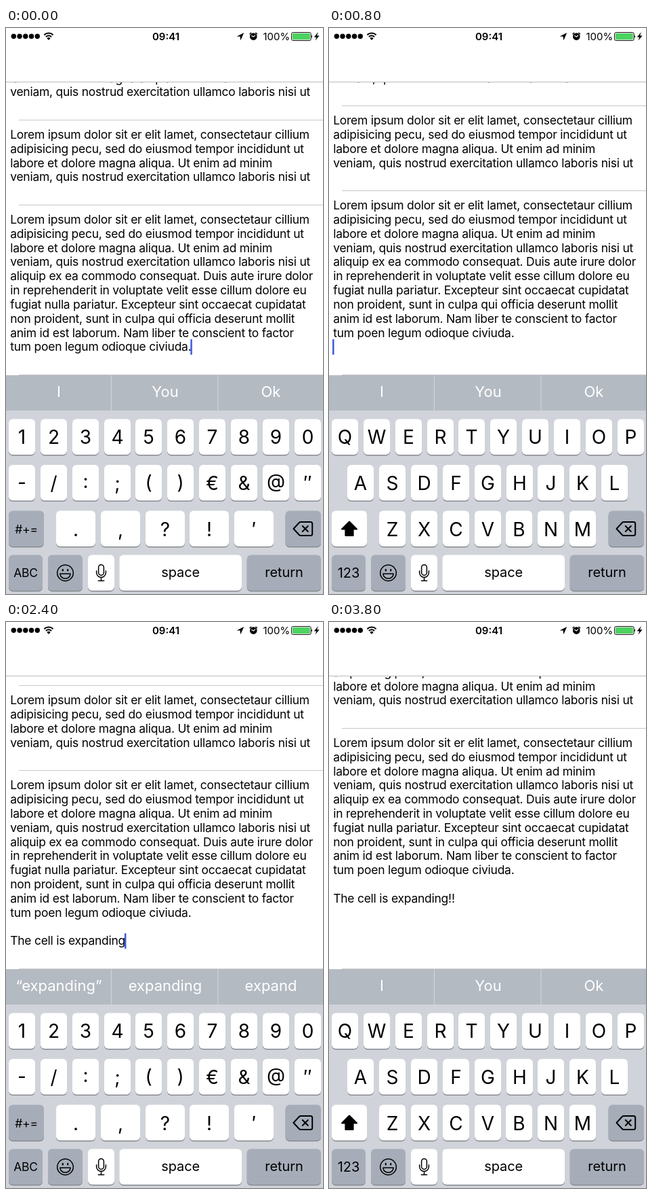
An HTML page that plays this animation: 468x833 px, repeating every 3.92 s.

```html
<!DOCTYPE html>
<html lang="en">
<head>
<meta charset="utf-8">
<title>Growing text cell</title>
<style>
  html, body { margin: 0; width: 100%; height: 100%; overflow: hidden; background: #fff; }
  svg { display: block; width: 468px; height: 833px; }
  text {
    font-family: Inter, Roboto, "Liberation Sans", sans-serif;
    font-optical-sizing: none;
    white-space: pre;
  }
  .body { font-size: 17.47px; letter-spacing: -.23px; }
  .time { font-size: 15px; font-weight: 600; text-anchor: middle; font-feature-settings: "case"; }
  .key { font-size: 28px; text-anchor: middle; font-feature-settings: "case"; }
  .low { font-size: 30px; text-anchor: middle; }
  .small { font-size: 17.5px; text-anchor: middle; letter-spacing: -.2px; }
  .word { font-size: 20px; text-anchor: middle; letter-spacing: -.1px; }
  .hint { font-size: 22px; fill: #fff; text-anchor: middle; }
  .h1 { font-size: 20px; fill-opacity: .75; }
  .h2 { font-size: 16px; fill-opacity: .5; }
  .h3 { fill-opacity: .5; }
  .line { fill: none; stroke: #000; stroke-width: 2; stroke-linejoin: round; stroke-linecap: round; }
  .thin { stroke-width: 1.5; }
  .balloon { fill: #fff; filter: drop-shadow(0 1px 3px rgba(0, 0, 0, .4)); }
</style>
</head>
<body>
<svg viewBox="0 0 468 833">
  <defs><clipPath id="view"><rect y="80" width="468" height="431"/></clipPath></defs>
  <rect width="468" height="833" fill="#fff"/>
  <g clip-path="url(#view)"><g id="list"></g></g>
  <rect y="79" width="468" height="1" fill="#bcbcbe"/>
  <g id="status"></g>
  <rect y="511" width="468" height="322" fill="#d0d3d9"/>
  <rect y="511" width="468" height="52" fill="#b4bac2"/>
  <path d="M155.5 511v52M313 511v52" stroke="#cfd3d8" stroke-width="1.2"/>
  <g id="hints"></g>
  <g id="keys"></g>
</svg>
<script>
const LOOP = 3920, STEP = 200, LINE = 20.83, LEFT = 6.2;
const DARK = '#a6adb9', WHITE = '#fff';

const LOREM = [
  'Lorem ipsum dolor sit er elit lamet, consectetaur cillium',
  'adipisicing pecu, sed do eiusmod tempor incididunt ut',
  'labore et dolore magna aliqua. Ut enim ad minim',
  'veniam, quis nostrud exercitation ullamco laboris nisi ut',
  'aliquip ex ea commodo consequat. Duis aute irure dolor',
  'in reprehenderit in voluptate velit esse cillum dolore eu',
  'fugiat nulla pariatur. Excepteur sint occaecat cupidatat',
  'non proident, sunt in culpa qui officia deserunt mollit',
  'anim id est laborum. Nam liber te conscient to factor',
  'tum poen legum odioque civiuda.'
];

// Hints: parts split by "|", each led by its style digit.
const BASIC = ['0I', '0You', '0Ok'];
const DONE = '\n\nThe cell is expanding!!';
const END = DONE + '\n\n\n';

const step = (typed, board, caret = 1, more = {}) => ({ typed, board, caret, hints: BASIC, ...more });
const STEPS = [
  step('', 'sym'),
  step('', 'sym', 0),
  step('', 'sym', 0, { shift: 5, bar: 1 }),
  step('\n', 'sym', 0),
  step('\n', 'upper'),
  step('\n\n', 'upper'),
  step('\n\nThe', 'lower', 1, { press: 'space', hints: ['0“T|2”', '0Th|1e', '0Tha|1t|2\'s'] }),
  step('\n\nThe ce', 'lower', 1, { hints: ['0“ce”', '0cell', '0certain'] }),
  step('\n\nThe cell is', 'lower', 1, { press: 'space', hints: ['0“is”', '0isn\'t', '0issue'] }),
  step('\n\nThe cell is e', 'lower', 1, { pop: 1, hints: ['3“|0e”', '0expec|1t|3e', '0everythin|1g'] }),
  step('\n\nThe cell is expa', 'lower', 1, { hints: ['0“expa”', '0expand', '0expanding'] }),
  step('\n\nThe cell is expandin', 'lower', 1, { hints: ['0“expandin”', '0expanding', '0expand'] }),
  step('\n\nThe cell is expanding', 'sym', 1, { hints: ['0“expanding”', '0expanding', '0expand'] }),
  step(DONE.slice(0, -1), 'sym'),
  step(DONE, 'sym'),
  step(DONE, 'sym', 1, { press: 'return' }),
  step(END, 'upper'),
  step(END, 'upper', 0),
  step(END, 'upper'),
  step(END, 'upper', 0)
];

const el = id => document.getElementById(id);
const esc = s => s.replace(/&/g, '&amp;');
const label = (cls, x, y, s) => `<text class="${cls}" x="${x}" y="${y}">${esc(s)}</text>`;
const rect = (x, y, w, h, fill, r = 0) =>
  `<rect x="${x}" y="${y}" width="${w}" height="${h}" rx="${r}" fill="${fill}"/>`;
const cap = (x, y, w, fill = WHITE) =>
  rect(x, y + 1.4, w, 52.6, '#888b90', 6) + rect(x, y, w, 52.6, fill, 6);

function drawStatus() {
  const dots = [0, 1, 2, 3, 4].map(i => `<circle cx="${11.3 + i * 8.75}" cy="12.3" r="3.7"/>`).join('');
  el('status').innerHTML = dots + `
    <path d="M56.4 10.2a9.4 9.4 0 0 1 13.2 0M58.9 13a5.9 5.9 0 0 1 8.2 0" fill="none" stroke="#000" stroke-width="2"/>
    <path d="M60.4 15.1a3.7 3.7 0 0 1 5.2 0L63 18z"/>
    ${label('time', 236, 17.6, '09:41')}
    <path d="M340.5 12.4L351.3 7l-5 11.2-.8-5.8z"/>
    <circle cx="365.3" cy="12.6" r="5.3"/>
    <path d="M359.6 9.2l2.6-2.4M371 9.2l-2.6-2.4" stroke="#000" stroke-width="1.3"/>
    <path d="M362.3 11.2l3 1.8 2.7-2.4" fill="none" stroke="#fff" stroke-width="1.2"/>
    <text x="379.5" y="17.7" font-size="15">100%</text>
    <rect x="421.6" y="6.6" width="28.6" height="11.8" rx="2" fill="none" stroke="#000"/>
    <rect x="423" y="8" width="25.8" height="9" rx="1" fill="#4cd35f"/>
    <path d="M451 10.5q2.2 2 0 4z"/>
    <path d="M460.8 6l-6 7.4h3.4l-1.6 5.2 6-7.4h-3.5z"/>`;
}

function drawList(s) {
  const lines = LOREM.slice();
  const [first, ...rest] = s.typed.split('\n');
  lines[9] += first;
  lines.push(...rest);
  const off = s.shift || rest.length * LINE;
  const row = (top, t, i) => label('body', LEFT, (top + 28 + i * LINE - off).toFixed(2), t);
  let out = '';
  for (const top of [10, 135]) {
    out += LOREM.slice(0, 4).map((t, i) => row(top, t, i)).join('');
    out += rect(19, Math.round(top - off), 449, 1, '#c8c7cc');
  }
  out += rect(19, Math.round(260 - off), 449, 1, '#c8c7cc');
  out += rect(19, s.shift ? 505 : 510, 449, 1, '#c8c7cc');
  out += lines.map((t, i) => row(260, t, i)).join('');
  if (s.bar) out += rect(462, 441, 3.2, 76, '#8c8c8c', 1.6);
  const list = el('list');
  list.innerHTML = out;
  if (s.caret) {
    const all = list.querySelectorAll('text');
    const x = LEFT - 1.2 + all[all.length - 1].getComputedTextLength();
    list.insertAdjacentHTML('beforeend', rect(x.toFixed(2), 458, 2.6, 23, '#3f60dd', 1));
  }
}

function drawHints(hints) {
  el('hints').innerHTML = hints.map((h, i) => {
    const parts = h.split('|').map(p => `<tspan class="h${p[0]}">${p.slice(1)}</tspan>`);
    return `<text class="hint" x="${[78, 235, 391][i]}" y="543">${parts.join('')}</text>`;
  }).join('');
}

function keyRow(chars, x, y, cls, pitch = 46.87, w = 39) {
  const base = y + (cls === 'low' ? 35 : 37);
  return [...chars].map((c, i) => {
    const left = Math.round(x + i * pitch);
    return cap(left, y, w) + label(cls, left + w / 2, base, c);
  }).join('');
}

const ICONS = `
  <path class="line" d="M424.5 737l8.3-9q1-1 2.4-1h14.4q2.6 0 2.6 2.6v14.8q0 2.6-2.6 2.6h-14.4q-1.4 0-2.4-1z"/>
  <path class="line" d="M437.8 733l8 8m0-8l-8 8"/>
  <circle class="line thin" cx="87.5" cy="802" r="11.8"/>
  <ellipse cx="83.8" cy="797.8" rx="1.2" ry="1.9"/><ellipse cx="91.2" cy="797.8" rx="1.2" ry="1.9"/>
  <path class="line thin" d="M79.8 803.2h15.4q-1 7-7.7 7t-7.7-7z"/>
  <rect class="line thin" x="136.6" y="790" width="7.8" height="15.4" rx="3.9"/>
  <path class="line thin" d="M133.6 799v2.6a6.9 6.9 0 0 0 13.8 0V799M140.5 808.6v4.6M136.3 813.4h8.4"/>`;

const BALLOON = `
  <path class="balloon" d="M116 629H164q12 0 12 12V683c0 14-16 16-16 32V757q0 6-6 6H127q-6 0-6-6V715c0-16-17-18-17-32V641q0-12 12-12z"/>
  <text x="140" y="682.5" font-size="38" text-anchor="middle">X</text>`;

function drawKeys({ board, press, pop }) {
  const sym = board === 'sym', upper = board === 'upper';
  let out;
  if (sym) {
    out = keyRow('1234567890', 4, 575.4, 'key') +
      keyRow('-/:;()€&@″', 4, 643, 'key') +
      keyRow('.,?!′', 74, 710.5, 'key', 65.75, 58) +
      cap(4, 710.5, 52, DARK) + label('small', 30, 743.5, '#+=');
  } else {
    const cls = upper ? 'key' : 'low';
    const rows = ['qwertyuiop', 'asdfghjkl', 'zxcvbnm'].map(r => upper ? r.toUpperCase() : r);
    out = keyRow(rows[0], 4, 575.4, cls) + keyRow(rows[1], 27.2, 643, cls) + keyRow(rows[2], 74, 710.5, cls) +
      cap(4, 710.5, 52, upper ? WHITE : DARK) +
      `<path class="line" d="M30 726.5l11 11h-5.4v9.4H24.4v-9.4H19z" style="fill:${upper ? '#000' : 'none'}"/>`;
  }
  out += cap(412.6, 710.5, 52.4, DARK) +
    cap(4, 775.4, 50, DARK) + (sym ? label('small', 29, 807.5, 'ABC') : label('word', 29, 809, '123')) +
    cap(62, 775.4, 51, DARK) + cap(121, 775.4, 39) +
    cap(167.3, 775.4, 180.7, press === 'space' ? DARK : WHITE) + label('word', 257.7, 808, 'space') +
    cap(355.7, 775.4, 109.3, press === 'return' ? WHITE : DARK) + label('word', 410.5, 808, 'return') +
    ICONS;
  el('keys').innerHTML = out + (pop ? BALLOON : '');
}

let shown = -1;
const start = performance.now();

function tick() {
  const i = Math.floor((performance.now() - start) % LOOP / STEP);
  if (i !== shown) {
    shown = i;
    drawList(STEPS[i]);
    drawHints(STEPS[i].hints);
    drawKeys(STEPS[i]);
  }
  requestAnimationFrame(tick);
}

drawStatus();
tick();
</script>
</body>
</html>
```
